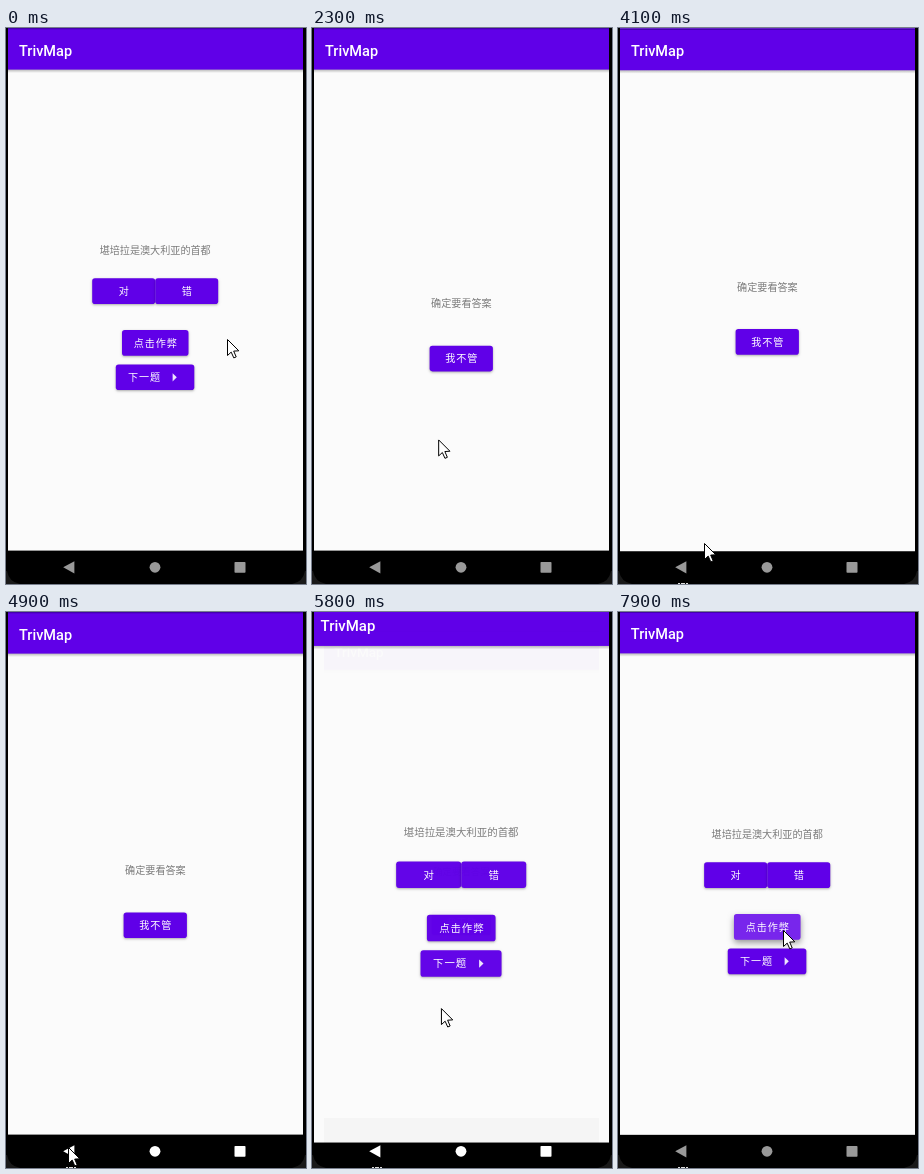
Write an HTML page with a canvas that moves like this. It is 300x556 px and loops after 8000 ms.

```html
<!DOCTYPE html>
<html lang="zh">
<head>
<meta charset="utf-8">
<title>Quiz demo</title>
<style>
html, body { margin: 0; width: 100%; height: 100%; overflow: hidden; background: #000; }
canvas { display: block; }
</style>
</head>
<body>
<canvas id="stage" width="300" height="556"></canvas>
<script>
const W = 300, H = 556, LOOP = 8000;
const PURPLE = '#6000e8', PAPER = '#fbfbfb', GREY = '#7b7b7b';
const CJK = '"Noto Sans CJK SC", "Noto Sans CJK", "Noto Sans CJK JP", sans-serif';
const OPEN = 1250, CLOSE = 4960;

const ctx = document.getElementById('stage').getContext('2d');
const layer = document.createElement('canvas');
layer.width = W;
layer.height = H;
const lc = layer.getContext('2d');

const clamp = v => Math.max(0, Math.min(1, v));
const mix = (a, b, k) => a + (b - a) * k;
const part = (t, start, length) => clamp((t - start) / length);

// Value of a cubic curve at a given x, found by bisection.
function curve(x, px, py) {
  const at = (p, s) => {
    const r = 1 - s;
    return r * r * r * p[0] + 3 * r * r * s * p[1] + 3 * r * s * s * p[2] + s * s * s * p[3];
  };
  let lo = 0, hi = 1;
  for (let i = 0; i < 24; i++) {
    const mid = (lo + hi) / 2;
    if (at(px, mid) < x) lo = mid; else hi = mid;
  }
  return at(py, (lo + hi) / 2);
}
const ease = (x1, x2) => k => k <= 0 ? 0 : k >= 1 ? 1 : curve(k, [0, x1, x2, 1], [0, 0, 1, 1]);
const slowIn = ease(0, 0.2);
const fastOutSlowIn = ease(0.4, 0.2);
const widen = ease(0, 0.4);
function extraSlowIn(k) {
  if (k <= 0 || k >= 1) return clamp(k);
  return k < 1 / 6
    ? curve(k, [0, 0.05, 0.133333, 1 / 6], [0, 0, 0.06, 0.4])
    : curve(k, [1 / 6, 0.208333, 0.25, 1], [0.4, 0.82, 1, 1]);
}

function label(c, text, cx, cy, color, gap = 0) {
  const size = 10.1, step = size + gap;
  c.font = `${gap ? 500 : 400} ${size}px ${CJK}`;
  c.fillStyle = color;
  c.textAlign = 'left';
  const x = cx - (text.length * step - gap) / 2;
  if (!gap) c.fillText(text, x, cy + 3.8);
  else [...text].forEach((ch, i) => c.fillText(ch, x + i * step, cy + 3.8));
}

function button(c, x, y, w, text, cx, lift = 0) {
  c.save();
  c.shadowColor = `rgba(0,0,0,${mix(0.32, 0.4, lift)})`;
  c.shadowBlur = mix(2.5, 6, lift);
  c.shadowOffsetY = mix(1, 3, lift);
  c.fillStyle = PURPLE;
  c.beginPath();
  c.roundRect(x, y, w, 25.7, 2.8);
  c.fill();
  c.restore();
  if (lift) {
    c.fillStyle = `rgba(255,255,255,${0.15 * lift})`;
    c.beginPath();
    c.roundRect(x, y, w, 25.7, 2.8);
    c.fill();
  }
  label(c, text, cx, y + 12.8, '#fff', 0.9);
}

function frame(c) {
  c.fillStyle = PAPER;
  c.fillRect(2, 0, 295, H);
  const shade = c.createLinearGradient(0, 41, 0, 45);
  shade.addColorStop(0, 'rgba(0,0,0,0.3)');
  shade.addColorStop(1, 'rgba(0,0,0,0)');
  c.fillStyle = shade;
  c.fillRect(2, 41, 295, 4);
  c.fillStyle = PURPLE;
  c.fillRect(2, 0, 295, 41.6);
  c.fillStyle = '#4300ac';
  c.fillRect(2, 0, 295, 1.3);
  c.fillStyle = '#fff';
  c.font = '500 14.5px Roboto, sans-serif';
  c.textAlign = 'left';
  c.fillText('TrivMap', 13, 27.6);
  c.fillStyle = '#000';
  c.fillRect(2, 522.6, 295, 60);
}

function quizPage(c, lift) {
  frame(c);
  label(c, '堪培拉是澳大利亚的首都', 149.2, 222, GREY);
  button(c, 86.2, 250.3, 63, '对', 117.7);
  button(c, 149.2, 250.3, 63, '错', 180.7);
  button(c, 116, 302, 66.5, '点击作弊', 149.4, lift);
  button(c, 109.8, 336.4, 78.5, '下一题', 138);
  c.fillStyle = '#eee4fd';
  c.beginPath();
  c.moveTo(166.6, 345.2);
  c.lineTo(170.8, 349.3);
  c.lineTo(166.6, 353.4);
  c.fill();
}

function answerPage(c) {
  frame(c);
  label(c, '确定要看答案', 149.4, 258.4, GREY);
  button(c, 117.6, 300.4, 63.3, '我不管', 149.4);
}

function zoom(c, s) {
  c.translate(149.5, 278);
  c.scale(s, s);
  c.translate(-149.5, -278);
}

// Answer page: revealed from the button, later shrinks and fades away.
function drawAnswer(t) {
  const fade = part(t, CLOSE + 350, 500);
  if (t < OPEN || fade >= 1) return;
  const closing = t >= CLOSE;
  lc.setTransform(1, 0, 0, 1, 0, 0);
  lc.clearRect(0, 0, W, H);
  if (closing) zoom(lc, mix(1, 0.9, extraSlowIn(part(t, CLOSE, 4000))));
  else lc.translate(0, 51 * (1 - slowIn(part(t, OPEN, 3360))));
  answerPage(lc);

  ctx.save();
  if (!closing) {
    const v = fastOutSlowIn(part(t, OPEN, 2330));
    const h = widen(part(t, OPEN, 1344));
    const left = mix(116, 0, h), top = mix(302, 0, v);
    ctx.beginPath();
    ctx.rect(left, top, mix(182, W, h) - left, mix(327.7, H, v) - top);
    ctx.clip();
    ctx.globalAlpha = mix(0.5, 1, slowIn(part(t, OPEN, 840)));
  } else {
    ctx.globalAlpha = 1 - fade;
  }
  ctx.drawImage(layer, 0, 0);
  ctx.restore();
}

function drawDevice(t) {
  // bezel and rounded lower corners
  ctx.fillStyle = '#000';
  ctx.fillRect(0, 0, 2, H);
  ctx.fillRect(297, 0, 3, H);
  ctx.fillStyle = '#191919';
  ctx.beginPath();
  ctx.moveTo(1, 543);
  ctx.quadraticCurveTo(3, 554, 14, H);
  ctx.lineTo(0, H);
  ctx.lineTo(0, 543);
  ctx.moveTo(299, 543);
  ctx.quadraticCurveTo(297, 554, 286, H);
  ctx.lineTo(W, H);
  ctx.lineTo(W, 543);
  ctx.fill();

  const glow = part(t, 4700, 100) - part(t, 7300, 500);
  const g = Math.round(mix(153, 255, glow));
  ctx.fillStyle = `rgb(${g},${g},${g})`;
  ctx.beginPath();
  ctx.moveTo(57.2, 539.3);
  ctx.lineTo(68.4, 533.2);
  ctx.lineTo(68.4, 545.4);
  ctx.fill();
  ctx.beginPath();
  ctx.arc(149, 539.3, 5.4, 0, 7);
  ctx.fill();
  ctx.beginPath();
  ctx.roundRect(228.5, 534, 11, 10.8, 0.8);
  ctx.fill();

  if (t >= 3200) {
    ctx.fillStyle = '#ddd';
    for (const x of [60, 63, 65, 68]) ctx.fillRect(x, 555, 2, 1);
  }
}

// Pointer stops: time, x, y
const stops = [
  [0, 221, 311], [100, 221, 311], [450, 190, 327], [800, 160, 317],
  [1850, 160, 317], [2700, 98, 490], [3000, 64, 544], [3200, 64, 544],
  [4000, 86, 515], [4200, 86, 515], [4600, 62, 535], [4900, 62, 535],
  [5400, 141, 448], [6500, 101, 276], [7000, 112, 288], [7750, 165, 318],
  [8000, 165, 318]
];

function drawPointer(t) {
  const i = Math.max(1, stops.findIndex(s => s[0] >= t));
  const a = stops[i - 1], b = stops[i];
  const k = part(t, a[0], b[0] - a[0]);
  const e = k * k * (3 - 2 * k);
  ctx.save();
  ctx.translate(mix(a[1], b[1], e) + 0.5, mix(a[2], b[2], e) + 0.5);
  ctx.beginPath();
  ctx.moveTo(0, 0);
  for (const [x, y] of [[0, 16], [3.7, 12.6], [6.3, 18.4], [8.7, 17.4], [6.2, 11.6], [11.3, 11.3]]) {
    ctx.lineTo(x, y);
  }
  ctx.closePath();
  ctx.fillStyle = '#fff';
  ctx.strokeStyle = '#000';
  ctx.lineWidth = 1;
  ctx.fill();
  ctx.stroke();
  ctx.restore();
}

function draw(t) {
  const lift = t < 4000 ? part(t, 600, 150) : part(t, 7650, 150);
  ctx.fillStyle = '#000';
  ctx.fillRect(0, 0, W, H);
  ctx.save();
  if (t >= CLOSE) zoom(ctx, mix(1.1, 1, extraSlowIn(part(t, CLOSE, 4000))));
  quizPage(ctx, lift);
  ctx.restore();
  drawAnswer(t);
  drawDevice(t);
  drawPointer(t);
}

const begin = performance.now();
function tick() {
  draw((performance.now() - begin) % LOOP);
  requestAnimationFrame(tick);
}
tick();
</script>
</body>
</html>
```
